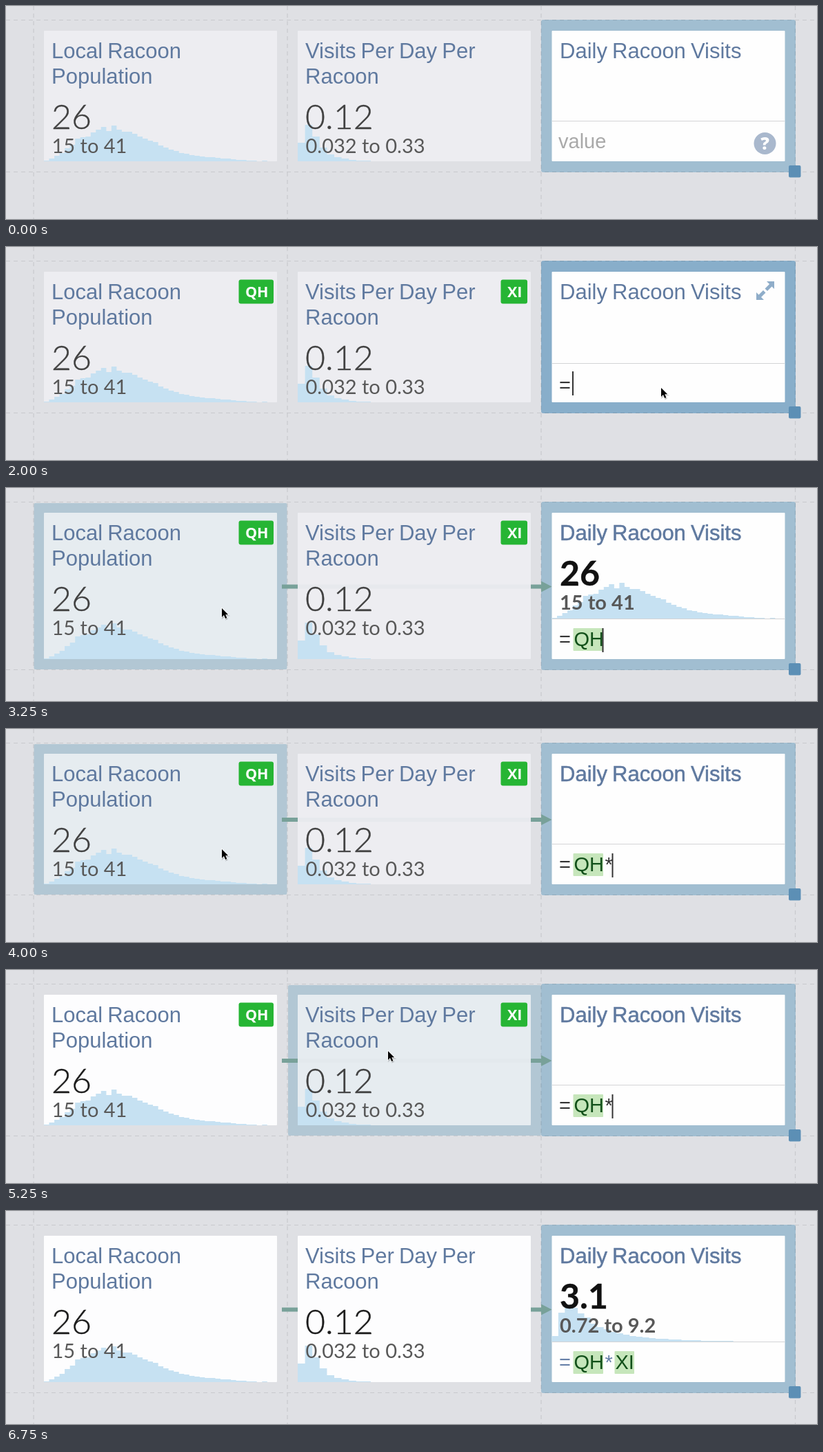
Write an HTML page that moves like this. It is 1176 px wide and 310 px high and loops after 7250 ms.

```html
<!DOCTYPE html>
<html lang="en">
<head>
<meta charset="utf-8">
<title>Linking cells with a formula</title>
<style>
  html, body { margin: 0; height: 100%; overflow: hidden; background: #dfe0e4; }
  svg { display: block; }
  text { font: 29px "Liberation Sans", Arial, sans-serif; white-space: pre; }
  .title { font-size: 31px; fill: #5f799f; word-spacing: -1.5px; }
  .title.strong { stroke: #5f799f; stroke-width: .5px; }
  .mean { font: 300 50px Lato, sans-serif; stroke: currentColor; stroke-width: .4px; }
  .range { font: 400 29px Lato, sans-serif; fill: #585858; }
  .result { font-weight: 700; }
  .badge { font: 700 21.5px "Open Sans", sans-serif; fill: #fff; }
  .help { font: 800 25px "Open Sans", sans-serif; fill: #fff; text-anchor: middle; }
  .hist { fill: #c6e1f2; }
</style>
</head>
<body>
<svg id="stage" width="1176" height="310" viewBox="0 0 1176 310"></svg>
<script>
const LOOP = 7250;

// Each step changes part of the state; `tokens` counts the typed formula parts.
const steps = [
  [0, { cursor: null, hover: 0, tokens: 0, caret: false, editing: false }],
  [500, { cursor: [1075, 157] }],
  [750, { cursor: [1007, 193] }],
  [1000, { cursor: [1003, 195] }],
  [1250, { cursor: [950, 205], hover: 3, caret: true }],
  [1500, { caret: false }],
  [2000, { tokens: 1, caret: true, editing: true }],
  [2250, { cursor: [540, 193], hover: 2 }],
  [2500, { cursor: [405, 175] }],
  [2750, { cursor: [312, 174], hover: 1, caret: false }],
  [3250, { cursor: [313, 175], tokens: 2, caret: true }],
  [3750, { caret: false }],
  [4000, { tokens: 3, caret: true }],
  [4500, { caret: false }],
  [4750, { cursor: [502, 127], hover: 2 }],
  [5000, { cursor: [553, 117], caret: true }],
  [5250, { cursor: [554, 118] }],
  [5500, { tokens: 4 }],
  [6000, { cursor: [617, 102], caret: false }],
  [6250, { cursor: null, hover: 0, caret: true }],
  [6750, { caret: false, editing: false }],
];

const population = [1, 4, 8, 12, 19, 24, 33, 35, 36, 42, 46, 50, 44, 52, 46, 43, 43, 40, 36, 33, 30, 28,
  23, 20, 17, 15, 12, 11, 9, 8, 7, 6, 6, 5, 4, 4, 3, 2, 2, 1, 1, 0, 1, 0, 0];
const visits = [27, 53, 36, 20, 10, 6, 4, 2, 1, 1];
const daily = [8, 42, 50, 49, 41, 35, 26, 21, 18, 14, 12, 10, 8, 7, 6, 5, 4, 4, 3, 3, 2, 2, 2, 1, 1, 1, 1, 1];
const caretX = [802.5, 822, 865.5, 879.5, 912];

const rect = (x, y, w, h, fill, extra = '') =>
  `<rect x="${x}" y="${y}" width="${w}" height="${h}" fill="${fill}" ${extra}/>`;
const label = (x, y, text, cls = '', fill = '') =>
  `<text x="${x}" y="${y}" class="${cls}" ${fill && `fill="${fill}" color="${fill}"`}>${text}</text>`;
const path = (d, extra) => `<path d="${d}" ${extra}/>`;

function histogram(x, base, step, heights) {
  const d = heights.map((h, i) => `V${base - h}H${(x + (i + 1) * step).toFixed(1)}`).join('');
  return path(`M${x} ${base}${d}V${base}Z`, 'class="hist"');
}

function grid(bottom) {
  const d = [20.5, bottom + .5].map(y => `M0 ${y}H1176`).join('') +
    [40, 408, 776, 1144.5].map(x => `M${x} 0V310`).join('');
  return path(d, 'stroke="#000" stroke-opacity=".1" stroke-width="1.2" stroke-dasharray="6 5"');
}

function inputCard(x, height, card, hovered, linked, editing) {
  const solid = linked && !hovered;
  const fill = solid ? '#fdfdfe' : hovered ? '#eaeef3' : '#eeeff3';
  const badge = editing
    ? rect(card.badgeX + .5, 47.5, x + 332.5 - card.badgeX, 35, '#26b534', 'rx="3"') +
      label(card.badgeX + 10, 73, card.id, 'badge')
    : '';
  return rect(x, 36, 338, height, fill, `rx="1" fill-opacity="${solid ? 1 : .94}"`) +
    histogram(x, 36 + height, card.step, card.bars) +
    card.title.map((line, i) => label(x + 11, 76 + i * 37, line, 'title')).join('') +
    label(x + 11, 179, card.mean, 'mean', solid ? '#1c1c1c' : '#404040') +
    label(x + 11.5, 214, card.range, 'range') + badge;
}

const cards = [
  { title: ['Local Racoon', 'Population'], mean: '26', range: '15 to 41', id: 'QH', badgeX: 337, step: 7.53, bars: population },
  { title: ['Visits Per Day Per', 'Racoon'], mean: '0.12', range: '0.032 to 0.33', id: 'XI', badgeX: 717, step: 10.6, bars: visits },
];

function formula({ tokens, editing }, y) {
  const ink = editing ? '#333' : '#6680a8';
  const chip = (x, w, id) =>
    rect(x, y - 26, w, 33, '#c6e6bb', 'rx="1"') + label(x + 1, y, id, '', '#12501a');
  return [
    label(802, y, '=', '', ink),
    chip(822.5, 43.5, 'QH'),
    label(868.5, y, '*', '', ink),
    chip(882.5, 28.5, 'XI'),
  ].slice(0, tokens).join('');
}

function formulaCard(s, height, grow) {
  const { tokens } = s;
  const divider = tokens === 1 ? 169.5 : 167.5 + grow;
  let out = rect(791.5, 36, 338, height, '#fefefe', 'rx="1"');
  if (grow) {
    const [mean, range, step, bars] = tokens === 2
      ? ['26', '15 to 41', 7.53, population]
      : ['3.1', '0.72 to 9.2', 9.4, daily];
    out += histogram(791.5, 190, step, bars) +
      label(803, 142, mean, 'mean result', '#111') + label(803, 177, range, 'range result');
  }
  out += path(`M792 ${divider}H1129`, 'stroke="#d3d4d6"') +
    label(803, 76, 'Daily Racoon Visits', tokens > 1 ? 'title strong' : 'title');
  if (!tokens) {
    out += label(801, 207, 'value', '', '#a9a9a9') +
      '<circle cx="1100.5" cy="200" r="16" fill="#a9b8cd"/>' + label(1100.5, 209, '?', 'help');
  }
  if (s.hover === 3) {
    out += path('M1114 50V61L1110.5 57.5L1104 64L1100.5 60.5L1107 54L1103 50Z' +
      'M1088 77V66L1091.5 69.5L1098 63L1101.5 66.5L1095 73L1099 77Z', 'fill="#8fadc9"');
  }
  out += formula(s, tokens === 1 ? 211 : 207 + grow);
  if (s.caret) out += rect(caretX[tokens] - 1, 181 + grow, 2, 35, '#333');
  return out;
}

function pointer([x, y]) {
  const d = 'M0 0V14L3.2 11L5.6 16.3L8 15.2L5.7 10H10Z';
  return `<g transform="translate(${x} ${y}) scale(.92)">` +
    path(d, 'transform="translate(.8 1.5)" fill="#0003" stroke="#0002" stroke-width="2"') +
    path(d, 'fill="#000" stroke="#fff" stroke-width="1.6" paint-order="stroke"') + '</g>';
}

function draw(s) {
  const grow = s.tokens === 2 || s.tokens === 4 ? 23 : 0;
  const height = 190 + grow, bottom = 241 + grow, mid = 132 + grow / 2;
  let out = '';
  if (s.hover === 1 || s.hover === 2) {
    out += rect(s.hover === 1 ? 40.5 : 409, 22, 367, bottom - 22, '#b2c7d4', 'rx="2"');
  }
  out += rect(776, 20, 369, bottom - 19, s.hover === 3 ? '#88aeca' : '#a1bed1', 'rx="3"') + grid(bottom);
  if (s.tokens > 1) {
    out += path(`M400 ${mid - 3}H776V${mid - 8}L791.5 ${mid}L776 ${mid + 8}V${mid + 3}H400Z`, 'fill="#78a199"');
  }
  cards.forEach((card, i) => {
    out += inputCard(55 + i * 368, height, card, s.hover === i + 1, s.tokens >= 2 * (i + 1), s.editing);
  });
  out += formulaCard(s, height, grow) + rect(1135, bottom - 9, 17.5, 17.5, '#5c8fb5', 'rx="2"');
  if (s.cursor) out += pointer(s.cursor);
  return out;
}

const stage = document.getElementById('stage');
let shown = 0;

function tick() {
  const time = performance.now() % LOOP;
  const count = steps.filter(([at]) => at <= time).length;
  if (count !== shown) {
    shown = count;
    stage.innerHTML = draw(Object.assign({}, ...steps.slice(0, count).map(([, change]) => change)));
  }
  requestAnimationFrame(tick);
}
tick();
</script>
</body>
</html>
```
